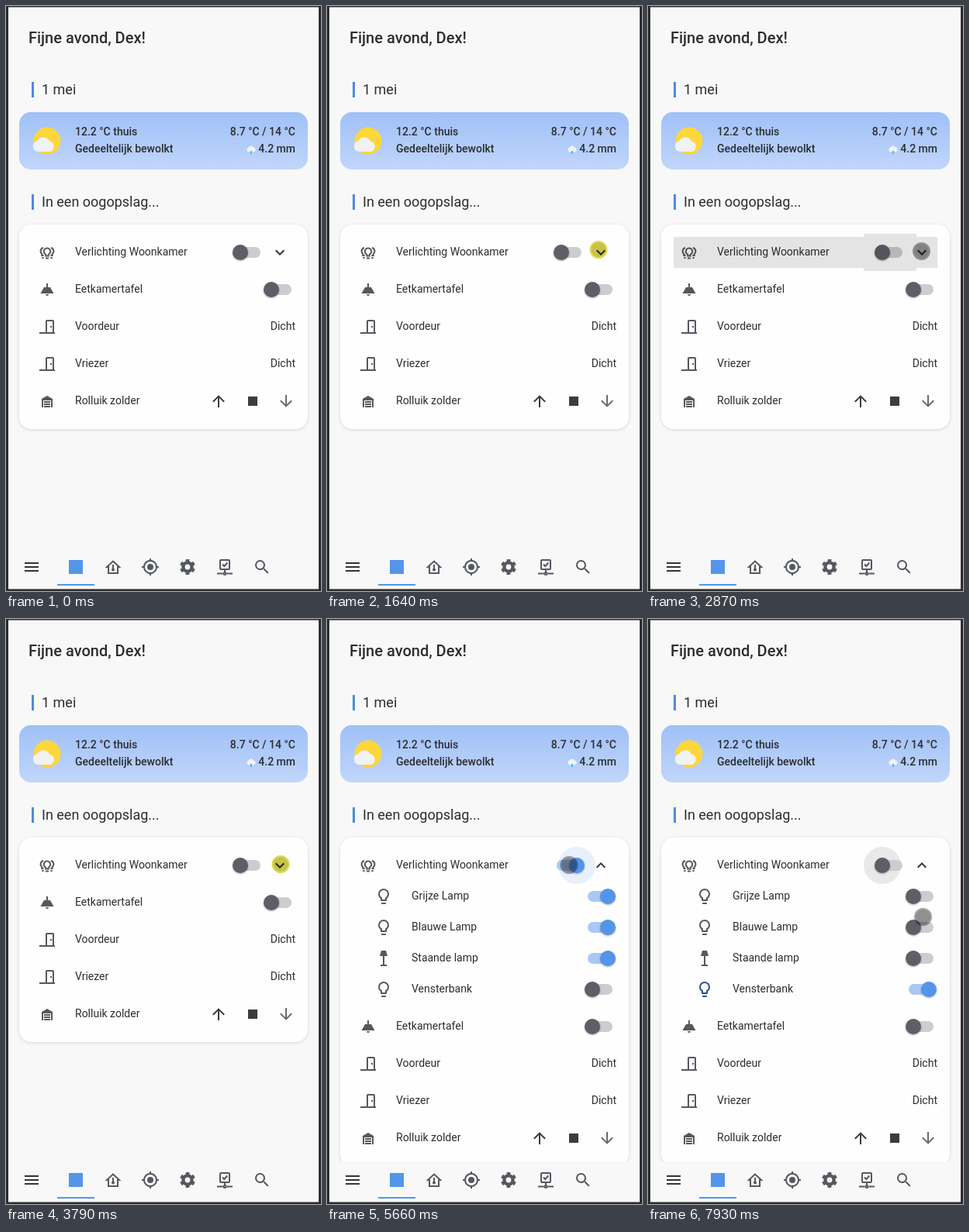
An HTML page for the animation above (8000 ms loop, 406 by 755 pixels).

```html
<!DOCTYPE html>
<html lang="nl">
<head>
<meta charset="utf-8">
<title>Dashboard</title>
<style>
html, body { margin: 0; width: 100%; height: 100%; overflow: hidden; background: #f8f8f8; }
svg { display: block; font: 14px Roboto, sans-serif; fill: #2b2d31; }
.title { font-size: 20px; font-weight: 500; }
.head { font-size: 18px; }
.bold { font-weight: 500; }
.end { text-anchor: end; }
.icon { fill: #55585f; }
.line { fill: none; stroke: #55585f; stroke-width: 2; }
#card { filter: drop-shadow(0 1px 2px #0002); }
.knob { filter: drop-shadow(0 1px 1px #0005); }
#cursor { mix-blend-mode: multiply; }
</style>
</head>
<body>
<svg id="stage" width="406" height="755" viewBox="0 0 406 755"></svg>
<script>
const LOOP = 8000;
const BLUE = [84, 149, 234], PALE = [170, 200, 246], DARK = [92, 95, 103], GREY = [205, 205, 208];

const paths = {
  bulb: 'M12,2A7,7 0 0,1 19,9C19,11.38 17.81,13.47 16,14.74V17A1,1 0 0,1 15,18H9A1,1 0 0,1 8,17V14.74C6.19,13.47 5,11.38 5,9A7,7 0 0,1 12,2M9,21V20H15V21A1,1 0 0,1 14,22H10A1,1 0 0,1 9,21M12,4A5,5 0 0,0 7,9C7,11.05 8.23,12.81 10,13.58V16H14V13.58C15.77,12.81 17,11.05 17,9A5,5 0 0,0 12,4Z',
  lamp: 'M9,2H15L17,9H7ZM11,9H13V20H16V22H8V20H11Z',
  ceiling: 'M8,9H11V4H13V9H16L20.5,17H3.5L8,9M14,18A2,2 0 0,1 10,18Z',
  door: 'M16,11H18V13H16V11M12,3H19C20.11,3 21,3.89 21,5V19H22V21H2V19H10V5C10,3.89 10.89,3 12,3M12,5V19H19V5H12Z',
  garage: 'M19,20H17V11H7V20H5V9L12,5L19,9V20M8,12H16V14H8V12M8,15H16V17H8V15M16,18V20H8V18H16Z',
  up: 'M13,20H11V8L5.5,13.5L4.08,12.08L12,4.16L19.92,12.08L18.5,13.5L13,8V20Z',
  down: 'M11,4H13V16L18.5,10.5L19.92,11.92L12,19.84L4.08,11.92L5.5,10.5L11,16V4Z',
  stop: 'M18,18H6V6H18Z',
  chevron: 'M7.41,8.58L12,13.17L16.59,8.58L18,10L12,16L6,10Z',
  menu: 'M3,6H21V8H3V6M3,11H21V13H3V11M3,16H21V18H3V16Z',
  gps: 'M12,8A4,4 0 0,1 12,16A4,4 0 0,1 12,8M3.05,13H1V11H3.05C3.5,6.83 6.83,3.5 11,3.05V1H13V3.05C17.17,3.5 20.5,6.83 20.95,11H23V13H20.95C20.5,17.17 17.17,20.5 13,20.95V23H11V20.95C6.83,20.5 3.5,17.17 3.05,13M12,5A7,7 0 0,0 12,19A7,7 0 0,0 12,5Z',
  search: 'M9.5,3A6.5,6.5 0 0,1 16,9.5C16,11.11 15.41,12.59 14.44,13.73L14.71,14H15.5L20.5,19L19,20.5L14,15.5V14.71L13.73,14.44C12.59,15.41 11.11,16 9.5,16A6.5,6.5 0 0,1 9.5,3M9.5,5C7,5 5,7 5,9.5C5,12 7,14 9.5,14C12,14 14,12 14,9.5C14,7 12,5 9.5,5Z'
};

const text = (x, y, s, cls = '') => `<text x="${x}" y="${y}" class="${cls}">${s}</text>`;
const at = (x, y, body, cls = '') => `<g class="${cls}" transform="translate(${x - 12} ${y - 12})">${body}</g>`;
const icon = (x, y, name, attr = '') => at(x, y, `<path d="${paths[name]}" ${attr}/>`, 'icon');
const toggle = (x, y) => `<g class="toggle" transform="translate(${x} ${y})">
  <circle class="ripple" r="24" opacity="0"/><rect class="track" x="-6" y="-7" width="32" height="14" rx="7"/>
  <circle class="knob" r="10"/></g>`;
const row = (y, name, label, end = '') => icon(53, y, name) + text(89, y + 4, label) + end;
const lampRow = (y, name, label) => icon(73, y, name, `id="${label}"`) + text(109, y + 4, label) + toggle(342, y);
const state = y => text(373, y + 4, 'Dicht', 'end');
const heading = (y, s) => `<rect x="33" y="${y - 16}" width="3" height="20" fill="#4f8ae0"/>` + text(46, y, s, 'head');
const cloud = (x, y, k) => `<path transform="translate(${x} ${y}) scale(${k})" fill="#f0f2f5"
  d="M7,22A7,7 0 0,1 6,8.3A9,9 0 0,1 22,8.5A7,7 0 0,1 23,22Z"/>`;

const sideBulb = '<path d="M7,6A4.6,4.6 0 0,0 5.3,14V16H7.6M5.3,19H7.6"/>';
const bulbGroup = `<path d="M10.2,16.5V14.6A4.2,4.2 0 1,1 13.8,14.6V16.5ZM10,19.5H14"/>${sideBulb}
  <g transform="matrix(-1 0 0 1 24 0)">${sideBulb}</g>`;
const house = '<path d="M6,20V12H4L12,4.5L20,12H18V20Z"/><path d="M12,9V15"/><circle cx="12" cy="15.5" r="1"/>';
const cog = `<circle cx="12" cy="12" r="5.6" stroke-width="4.4"/><circle cx="12" cy="12" r="8.3" stroke-width="3.4"
  pathLength="12" stroke-dasharray="1.05 .95" transform="rotate(-105.75 12 12)"/>`;
const network = '<rect x="6" y="3" width="12" height="12" rx="1"/><path d="M9,8.5L11.3,11L15.3,6.5M12,15V19M2,20.5H9.5M14.5,20.5H22"/><circle cx="12" cy="20.5" r="1.5"/>';

stage.innerHTML = `
<defs><linearGradient id="sky" x2="0" y2="1"><stop stop-color="#9fc0f7"/><stop offset="1" stop-color="#c1d6fa"/></linearGradient></defs>
<rect width="406" height="755" fill="#f8f8f8"/>
${text(29, 48, 'Fijne avond, Dex!', 'title')}
${heading(114, '1 mei')}
<rect x="17" y="137" width="372" height="74" rx="15" fill="url(#sky)"/>
<circle cx="53" cy="174" r="17.5" fill="#fdd63b"/>${cloud(34, 166, 1)}
${text(89, 167, '12.2 °C thuis', 'bold')}${text(89, 189, 'Gedeeltelijk bewolkt', 'bold')}
${text(373, 167, '8.7 °C / 14 °C', 'bold end')}${text(373, 189, '4.2 mm', 'bold end')}
${cloud(310, 179, .42)}<path d="M316,187v4" stroke="#55b4f0" stroke-width="2"/>
${heading(259, 'In een oogopslag...')}
<rect id="card" x="17" y="282" width="372" height="264" rx="16" fill="#fefefe"/>
${at(53, 318, bulbGroup, 'line')}${text(89, 322, 'Verlichting Woonkamer')}
${toggle(302, 318)}
<g id="chevron">${icon(0, 0, 'chevron', 'fill="#333"')}</g>
<g id="lamps">
${lampRow(358, 'bulb', 'Grijze Lamp')}${lampRow(398, 'bulb', 'Blauwe Lamp')}
${lampRow(438, 'lamp', 'Staande lamp')}${lampRow(478, 'bulb', 'Vensterbank')}
</g>
<g id="rest">
${row(366, 'ceiling', 'Eetkamertafel', toggle(342, 366))}
${row(414, 'door', 'Voordeur', state(414))}
${row(462, 'door', 'Vriezer', state(462))}
${row(510, 'garage', 'Rolluik zolder')}
${icon(274, 510, 'up', 'fill="#3c3c3e"')}${icon(318, 510, 'stop', 'fill="#3c3c3e"')}${icon(361, 510, 'down', 'fill="#6c6c6f"')}
</g>
<path id="flash" d="M33,298H278V294H346V298H373V338H346V342H278V338H33Z" fill="#000"/>
<rect y="700" width="406" height="55" fill="#f8f8f8"/>
${icon(33, 724, 'menu', 'fill="#333"')}
<rect x="81" y="715" width="18" height="18" fill="#5495ea"/>
<rect x="66" y="746" width="48" height="2" fill="#5495ea"/>
${at(138, 724, house, 'line')}${icon(186, 724, 'gps')}${at(234, 724, cog, 'line')}
${at(282, 724, network, 'line')}${icon(330, 724, 'search')}
<path d="M0,0H406V755H0ZM3,1.5V752.5H403V1.5Z" fill="#2c2c2e" fill-rule="evenodd"/>
<circle id="cursor" r="10.5" stroke-width="2"/>`;

const $ = id => document.getElementById(id);
const [group, grey, blue, standing, sill, table] = document.querySelectorAll('.toggle');
const clamp = v => Math.max(0, Math.min(1, v));
const ramp = (t, start, span) => clamp((t - start) / span);
const within = (t, spans) => spans.some(([a, b]) => t >= a && t < b);
const mix = (a, b, p) => `rgb(${a.map((v, i) => v + (b[i] - v) * p)})`;

// time, x, y of the touch pointer
const route = [
  [230, 314, 721], [500, 340, 630], [760, 361, 485], [1010, 365, 344], [1250, 353, 318], [1560, 350, 314.5],
  [2309, 350, 314.5], [2310, 351, 316], [2479, 351, 316], [2480, 352.5, 316.5],
  [3479, 352.5, 316.5], [3570, 354, 316.5], [4739, 354, 316.5], [4740, 340, 314.5],
  [4799, 340, 314.5], [4800, 327, 315], [4969, 327, 315], [5120, 313, 317], [5280, 312, 317.5],
  [7380, 312, 317.5], [7620, 335, 345], [7850, 354.5, 380], [7930, 354.5, 384.5], [LOOP, 354.5, 384.5]
];
const presses = [[1640, 1770], [2710, 2870], [3790, 3950], [5280, 5430], [7060, 7220]];
const strong = [[1770, 1850], [2870, 3030], [3950, 4110], [5430, 5510], [7220, 7290]];
const faint = [[1850, 1930], [3030, 3100], [4110, 4190]];

function pointer(t) {
  const i = Math.max(1, route.findIndex(k => k[0] > t));
  const [a, b] = [route[i - 1], route[i]];
  const p = ramp(t, a[0], b[0] - a[0]);
  return [a[1] + (b[1] - a[1]) * p, a[2] + (b[2] - a[2]) * p];
}

function setToggle(el, p, ripple = 0) {
  const [halo, track, knob] = el.children;
  const color = mix(DARK, BLUE, p);
  for (const part of [halo, knob]) {
    part.setAttribute('cx', 20 * p);
    part.setAttribute('fill', color);
  }
  halo.setAttribute('opacity', .13 * ripple);
  halo.setAttribute('r', 24 * ripple);
  track.setAttribute('fill', mix(GREY, PALE, p));
}

function draw(now) {
  const t = now % LOOP;
  const open = within(t, [[1770, 2870], [3950, LOOP]]);
  const power = (on, off) => ramp(t, on, 140) - ramp(t, off, 140);

  $('card').setAttribute('height', open ? 424 : 264);
  $('lamps').style.display = open ? '' : 'none';
  $('rest').setAttribute('transform', `translate(0 ${open ? 160 : 0})`);
  $('chevron').setAttribute('transform', `translate(353 318) scale(1 ${open ? -1 : 1})`);
  $('flash').setAttribute('opacity', within(t, strong) ? .1 : within(t, faint) ? .04 : 0);

  setToggle(group, power(5430, 7220), ramp(t, 5430, 160));
  for (const lamp of [grey, blue, standing]) setToggle(lamp, power(5510, 7300));
  setToggle(sill, ramp(t, 6050, 140));
  setToggle(table, 0);
  $('Vensterbank').setAttribute('fill', mix([85, 88, 95], [42, 82, 136], ramp(t, 6050, 230)));

  const pressed = within(t, presses);
  const [x, y] = pointer(t);
  const dot = $('cursor');
  dot.style.display = t < 230 ? 'none' : '';
  dot.setAttribute('cx', x);
  dot.setAttribute('cy', y);
  dot.setAttribute('fill', pressed ? '#c8c446' : '#919191');
  dot.setAttribute('stroke', pressed ? '#dedb5c' : '#a3a3a3');
}

const start = performance.now();
function loop() {
  draw(performance.now() - start);
  requestAnimationFrame(loop);
}
loop();
</script>
</body>
</html>
```
